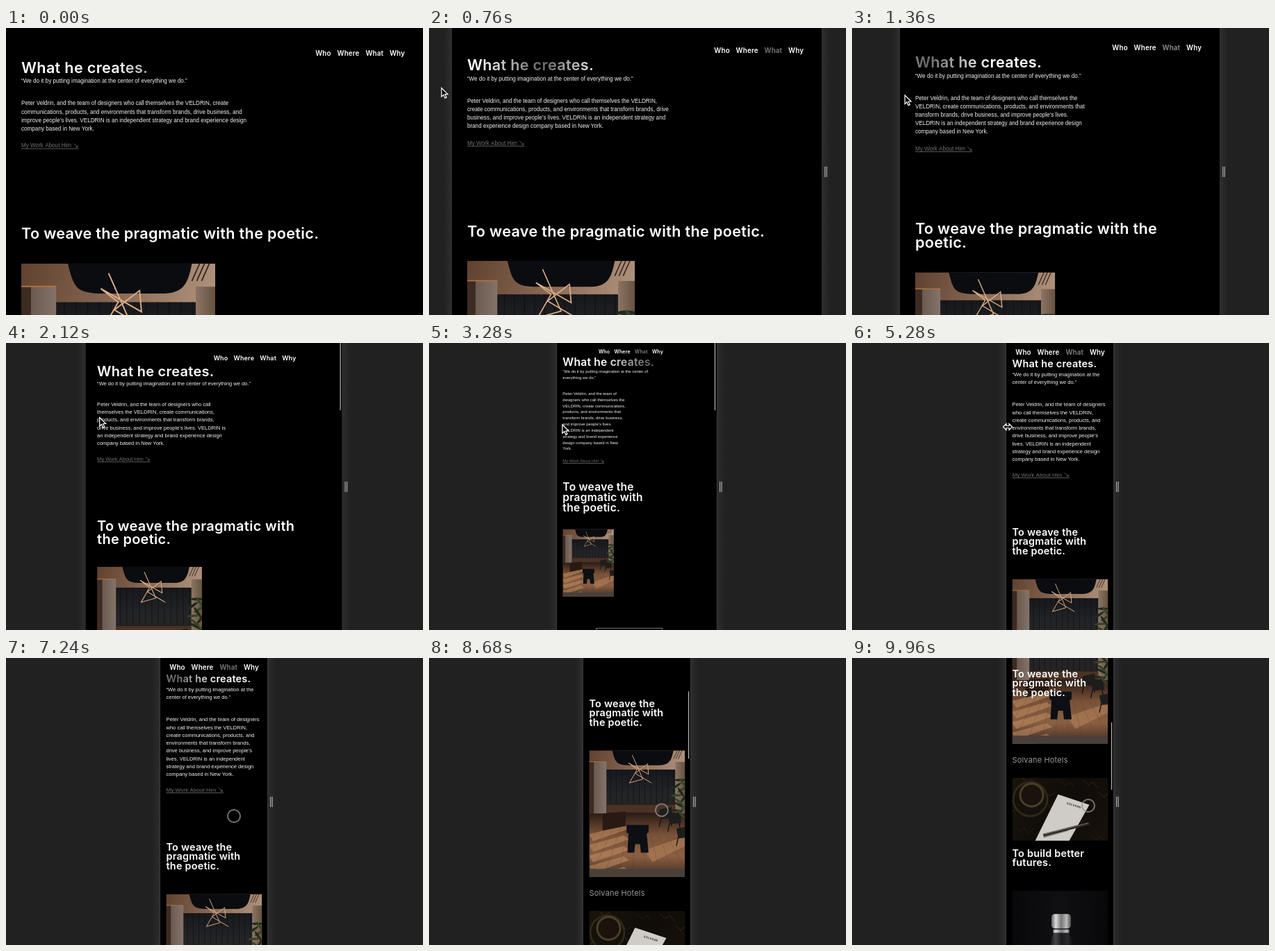
These frames come from a looping animation (600x414 px, 10 s). An HTML page with a canvas:

```html
<!DOCTYPE html>
<html lang="en">
<head>
<meta charset="utf-8">
<title>Responsive page</title>
<style>
html, body { margin: 0; width: 100%; height: 100%; overflow: hidden; background: #000; }
canvas { display: block; }
</style>
</head>
<body>
<canvas id="stage" width="600" height="414"></canvas>
<script>
const ctx = document.getElementById('stage').getContext('2d');
const LOOP = 10, BREAKPOINT = 3.7, SCROLL = 399.5;   // seconds, seconds, pixels
const SANS = '"Liberation Sans", Arial, sans-serif';
const WIDE = 'Inter, sans-serif';

const QUOTE = '“We do it by putting imagination at the center of everything we do.”';
const ABOUT = 'Peter Veldrin, and the team of designers who call themselves the VELDRIN, create ' +
  'communications, products, and environments that transform brands, drive business, and improve ' +
  'people’s lives. VELDRIN is an independent strategy and brand experience design company based in New York.';
const CLAIM = 'To weave the pragmatic with the poetic.';

const clamp = (v, low, high) => Math.min(high, Math.max(low, v));
const mix = (a, b, k) => a + (b - a) * k;
function ease(t, start, end) {
  const k = clamp((t - start) / (end - start), 0, 1);
  return k * k * (3 - 2 * k);
}

// The left page edge moves quickly at first, then slowly until it rests.
const edgeAt = t => clamp(Math.min(60 * (t - 0.213), 17.6 * t + 130.5), 0, 222);

function desktopLayout(w) {
  const title = Math.min(21.6, 8.4 + w * 0.0313);
  const titleY = Math.min(7.5 + w * 0.109, 31.5 + w * 0.0555);
  return {
    title, titleY,
    margin: Math.min(w * 0.06 - 5.5, 22),
    nav: title * 0.455, navY: titleY - title * 1.14, navInset: clamp(232 - w * 0.45, 26, 77),
    body: title * 0.377, bodyWidth: w * 0.68 - 65, quoteWidth: w * 0.95 - 68,
    quoteGap: 0.67, aboutGap: 2.63, link: 1,
    claimY: titleY + title * 9.8 + 28, claimWidth: w * 1.19 - 133,
    photoGap: 1.63, photoWidth: w * 0.555 - 54
  };
}

function mobileLayout(w) {
  const title = 16.1 - w * 0.0108, titleY = 35.2, photoWidth = w * 0.7 + 30, bodyWidth = w * 0.76 + 21;
  return {
    title, titleY, photoWidth, bodyWidth,
    margin: 8.5,
    nav: title * 0.68, navY: titleY - title * 1.28, navInset: w * 0.27 - 29.5,
    body: title * 0.521, quoteWidth: bodyWidth,
    quoteGap: 0.9, aboutGap: 2.82, link: 1.08,
    claimY: 307 - w * 0.19, claimWidth: photoWidth * 0.92,
    photoGap: 2.45
  };
}

function rect(color, x, y, w, h) {
  ctx.fillStyle = color;
  ctx.fillRect(x, y, w, h);
}

function trace(...p) {
  ctx.beginPath();
  for (let i = 0; i < p.length; i += 2) ctx.lineTo(p[i], p[i + 1]);
}

function poly(color, ...p) {
  trace(...p);
  ctx.fillStyle = color;
  ctx.fill();
}

function line(color, width, ...p) {
  trace(...p);
  ctx.strokeStyle = color;
  ctx.lineWidth = width;
  ctx.stroke();
}

function oval(color, x, y, rx, ry = rx, turn = 0) {
  ctx.beginPath();
  ctx.ellipse(x, y, rx, ry, turn, 0, 7);
  ctx.fillStyle = color;
  ctx.fill();
}

// Linear gradient with evenly spaced colours.
function blend(x0, y0, x1, y1, ...colors) {
  const g = ctx.createLinearGradient(x0, y0, x1, y1);
  colors.forEach((c, i) => g.addColorStop(i / (colors.length - 1), c));
  return g;
}

function setFont(size, family, weight = 400, spacing = 0) {
  ctx.font = `${weight} ${size}px ${family}`;
  ctx.letterSpacing = size * spacing + 'px';
}
const wideFont = (size, weight = 600) => setFont(size, WIDE, weight, 0.015);

function wrap(text, width) {
  const rows = [''];
  for (const word of text.split(' ')) {
    const last = rows.length - 1, next = rows[last] ? rows[last] + ' ' + word : word;
    if (rows[last] && ctx.measureText(next).width > width) rows.push(word);
    else rows[last] = next;
  }
  return rows;
}

// Draws the rows and returns the baseline of the last one.
function write(rows, x, y, pitch) {
  rows.forEach((row, i) => ctx.fillText(row, x, y + i * pitch));
  return y + (rows.length - 1) * pitch;
}

function picture(x, y, scale, w, h, draw) {
  ctx.save();
  ctx.translate(x, y);
  ctx.scale(scale, scale);
  ctx.beginPath();
  ctx.rect(0, 0, w, h);
  ctx.clip();
  draw();
  ctx.restore();
}

function lobby() {
  rect(blend(0, 0, 100, 30, '#5f412f', '#8a6a55', '#b39680'), 0, 0, 100, 70);
  rect('#3d2b21', 0, 12, 5, 60);
  rect(blend(5, 0, 18, 0, '#6a5a50', '#84736a'), 5, 12, 13, 62);
  rect('#b07440', 0, 11.5, 18, 0.7);
  rect(blend(0, 20, 0, 70, '#17181b', '#232427', '#2b211b'), 18, 20, 72, 52);
  for (let x = 22; x < 90; x += 6) rect('#101114', x, 20, 0.5, 36);
  rect('#4a3326', 18, 57, 74, 8);
  rect(blend(90, 0, 100, 0, '#8c7465', '#65523f'), 90, 12, 10, 62);
  ctx.beginPath();
  ctx.moveTo(24, 0);
  ctx.bezierCurveTo(27, 12, 28, 15, 40, 15.5);
  ctx.lineTo(74, 15.5);
  ctx.bezierCurveTo(84, 15, 86, 10, 88, 0);
  ctx.fillStyle = '#0b0c10';
  ctx.fill();
  for (let x = 90; x < 96; x += 2.5) line('#2c211b', 0.6, x + 2, 0, x - 2, 9);

  rect(blend(0, 66, 0, 133, '#2c1d16', '#7a5238', '#8a5f42', '#3d2d23'), 0, 66, 100, 67);
  for (let y = 78; y < 125; y += 11) poly('#c2906488', 0, y + 10, 36, y, 42, y + 4, 4, y + 17);
  poly('#b7865d88', 58, 104, 100, 90, 100, 100, 66, 117);
  for (let i = -2; i < 8; i++) line('#4b302066', 0.4, i * 15, 133, 30 + i * 6, 72);
  rect('#4a403a', 0, 124, 100, 9);
  poly('#281a13', 14, 66, 38, 64, 38, 79, 14, 84);
  poly('#0d0f15', 39, 78, 62, 78, 62, 86, 60, 87, 62, 107, 54, 107, 53, 98, 48, 98, 47, 107, 40, 107, 41, 87, 39, 86);
  for (let i = 0; i < 3; i++) {
    const x = 73 + i * 9, y = 62 + i * i * 5;
    poly('#1d1e1c', x, y, x + 13, y - 3, x + 14, y + 9, x + 2, y + 10);
    line('#15110e', 1, x + 2, y + 9, x, y + 18);
    line('#15110e', 1, x + 12, y + 8, x + 13, y + 17);
  }
  for (let i = 0; i < 12; i++)
    oval(i % 2 ? '#38442a' : '#1f2a1b', 95 + 4 * Math.sin(i * 2.3), 31 + i * 3.2, 6, 1.3, Math.sin(i * 1.9));
  line('#d9ad86', 0.7, 45, 5, 56, 30, 42, 34, 50, 20, 41, 13, 62, 25, 61, 14, 48, 24, 65, 34);
}

function desk() {
  rect(blend(0, 0, 138, 91, '#1a140c', '#0f0c09', '#18110b'), 0, 0, 138, 91);
  for (let i = 0; i < 14; i++) {
    const x = i * 11, y = 42 + 42 * Math.sin(i * 2.4);
    line(i % 2 ? '#3a2a16' : '#523a1c', 0.6, x - 8, y, x, y + 7, x + 6, y + 2, x + 13, y + 11);
  }
  oval('#2f2718', 26, 31, 26);
  oval('#14110b', 26, 31, 23);
  oval('#4a3f28', 28, 25, 18);
  oval('#1a120b', 28, 25, 15);
  poly('#cfcbc7', 66, 24, 111, 39, 82, 91, 33, 91);
  ctx.save();
  ctx.translate(78, 38);
  ctx.rotate(0.3);
  ctx.fillStyle = '#333';
  setFont(4, WIDE, 700, 0.1);
  ctx.fillText('SOLVANE', 0, 0);
  ctx.restore();
  line('#8d857e', 4, 45, 85, 80, 75);
  line('#2b2927', 4, 45, 83, 111, 66);
  line('#77716c', 1, 47, 81.5, 109, 65.5);
}

function bottle() {
  rect(blend(0, 0, 138, 0, '#08080a', '#101013', '#08080a'), 0, 0, 138, 180);
  const steel = blend(55, 0, 86, 0, '#444', '#ddd', '#777', '#bbb', '#333');
  ctx.fillStyle = steel;
  ctx.beginPath();
  ctx.roundRect(56.5, 33.5, 28, 21, 5);
  ctx.fill();
  rect(steel, 59, 56, 23, 5);
  ctx.beginPath();
  ctx.moveTo(59, 61);
  ctx.quadraticCurveTo(57, 71, 54, 78);
  ctx.lineTo(54, 180);
  ctx.lineTo(88, 180);
  ctx.lineTo(88, 78);
  ctx.quadraticCurveTo(85, 71, 82, 61);
  ctx.fillStyle = blend(54, 0, 88, 0, '#151517', '#454547', '#1a1a1c', '#29292b', '#0e0e10');
  ctx.fill();
}

function drawNav(right, y, size, t) {
  wideFont(size);
  const level = 255 * (0.7 + 0.3 * Math.cos(t * Math.PI));
  for (const word of ['Why', 'What', 'Where', 'Who']) {
    right -= ctx.measureText(word).width;
    ctx.fillStyle = word === 'What' ? `rgb(${level},${level},${level})` : '#fff';
    ctx.fillText(word, right, y);
    right -= size * 0.9;
  }
}

// A grey band sweeps through the title from right to left.
function drawTitle(x, y, size, t) {
  wideFont(size);
  const text = 'What he creates.', w = ctx.measureText(text).width, span = 2.44;
  const center = ((2.02 - 0.83 * t) % span + span) % span - 0.8;
  ctx.fillStyle = blend(x + (center - 0.5) * w, 0, x + (center + 0.5) * w, 0, '#fff', '#666', '#fff');
  ctx.fillText(text, x, y);
}

function drawLink(x, y, size) {
  setFont(size, SANS);
  const color = '#707070', text = 'My Work About Him ', w = ctx.measureText(text).width, s = size * 0.7;
  ctx.fillStyle = color;
  ctx.fillText(text, x, y);
  rect(color, x, y + 1.2, w + size, 0.8);
  const ax = x + w + 1;
  line(color, 0.8, ax, y - s, ax + s, y - 0.5);
  line(color, 0.8, ax + s * 0.5, y - 0.5, ax + s, y - 0.5, ax + s, y - s * 0.5);
}

function drawPage(t, left, right, scroll) {
  const mobile = t >= BREAKPOINT;
  const p = (mobile ? mobileLayout : desktopLayout)(right - left);
  const x = left + p.margin, lead = p.body * 1.5, pitch = p.title * 0.95;

  drawNav(right - p.navInset, p.navY - scroll, p.nav, t);
  drawTitle(x, p.titleY - scroll, p.title, t);

  setFont(p.body, SANS);
  ctx.fillStyle = '#f2f2f2';
  let y = p.titleY + p.title * p.quoteGap - scroll;
  y = write(wrap(QUOTE, p.quoteWidth), x, y, lead);
  y = write(wrap(ABOUT, p.bodyWidth), x, y + lead * p.aboutGap, lead);
  drawLink(x, y + lead * 2, p.body * p.link);

  wideFont(p.title);
  const claim = wrap(CLAIM, p.claimWidth);
  const top = p.claimY + (claim.length - 1) * pitch + p.title * p.photoGap - scroll;
  const bottom = top + p.photoWidth * 1.325;
  picture(x, top, p.photoWidth / 100, 100, 132.5, lobby);

  if (mobile) {
    wideFont(11, 400);
    ctx.fillStyle = '#999';
    ctx.fillText('Solvane Hotels', x, bottom + 27.5);
    picture(x, bottom + 49, 1, 138, 91, desk);
    picture(x, bottom + 212, 1, 138, 180, bottle);
    wideFont(p.title);
    ctx.fillStyle = '#fff';
    write(['To build better', 'futures.'], x, bottom + 163, pitch);
  } else {
    ctx.strokeStyle = '#777';
    ctx.lineWidth = 1;
    ctx.strokeRect(left + 56.5, bottom + 45.5, 95, 60);
  }

  // The claim sticks near the top while the photo slides beneath it.
  wideFont(p.title);
  ctx.fillStyle = '#fff';
  write(claim, x, Math.max(p.claimY - scroll, 27.5), pitch);
}

function drawPointer(t, left) {
  if (t > 6.4) {
    const go = ease(t, 6.4, 7.1), drift = ease(t, 7.2, 9.9);
    ctx.beginPath();
    ctx.arc(mix(222, 328, go) + 12 * drift, mix(120, 228, go) - 15 * drift, 9, 0, 7);
    ctx.strokeStyle = 'rgba(150,150,150,.75)';
    ctx.lineWidth = 2;
    ctx.stroke();
    return;
  }
  const arrow = t < BREAKPOINT, rest = (4.4 - Math.min(t, 4.4)) ** 2;
  ctx.save();
  ctx.translate(arrow ? 210 - 14.5 * rest : left + 2, 121 - 2.6 * rest);
  if (arrow) trace(0, 0, 0, 12.5, 2.8, 9.8, 5, 14.6, 7.2, 13.6, 5, 9, 9, 9);
  else trace(-6.5, 0, -2, -4.5, -2, -1.5, 2, -1.5, 2, -4.5, 6.5, 0, 2, 4.5, 2, 1.5, -2, 1.5, -2, 4.5);
  ctx.closePath();
  ctx.fillStyle = '#000';
  ctx.strokeStyle = '#fff';
  ctx.lineWidth = 1.2;
  ctx.fill();
  ctx.stroke();
  ctx.restore();
}

function drawFrame(left, right) {
  const glow = 12;
  rect(blend(left - glow, 0, left, 0, '#212121', '#2e2e2e'), left - glow, 0, glow, 414);
  rect(blend(right, 0, right + glow, 0, '#2e2e2e', '#212121'), right, 0, glow, 414);
  rect('#444', left - 0.5, 0, right - left + 1, 414);
  for (const x of [4, 6.5]) rect('#aaa', right + x, 200, 1.2, 15);
}

function frame(now) {
  const t = now / 1000 % LOOP;
  const left = edgeAt(t), right = left ? 598 - left : 600;
  const scroll = SCROLL * ease(t, 7.4, 9.9);

  rect('#212121', 0, 0, 600, 414);
  if (left) drawFrame(left, right);
  rect('#000', left, 0, right - left, 414);

  ctx.save();
  ctx.beginPath();
  ctx.rect(left, 0, right - left, 414);
  ctx.clip();
  drawPage(t, left, right, scroll);
  if (t > 2.1 && t < 5.2 || scroll) rect('#bbb', right - 3, scroll / SCROLL * 93, 1.2, 97);
  ctx.restore();

  drawPointer(t, left);
  requestAnimationFrame(frame);
}
requestAnimationFrame(frame);
</script>
</body>
</html>
```
